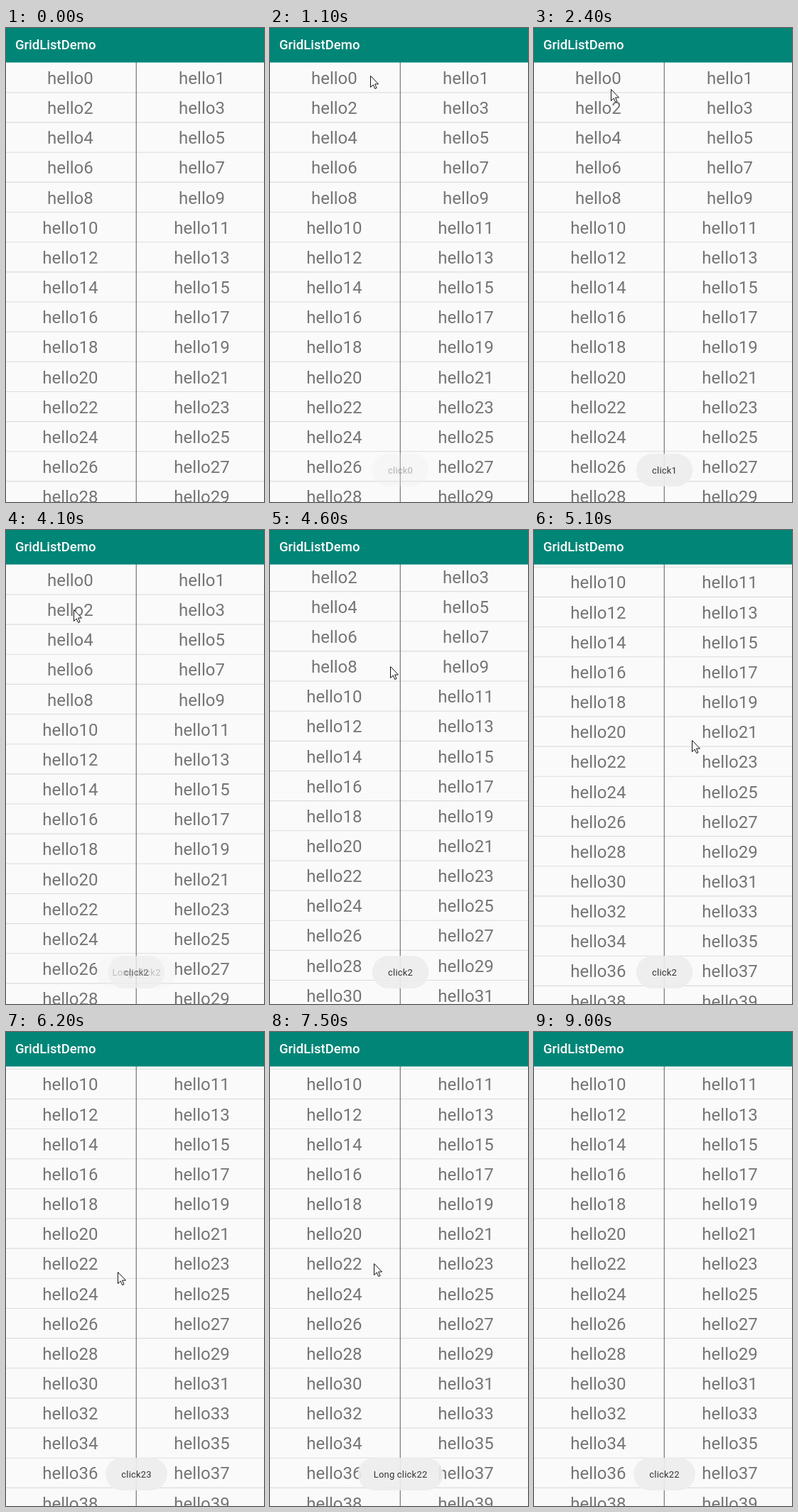
Write an HTML page that moves like this. It is 363 by 668 pixels and loops after 9600 ms.

```html
<!DOCTYPE html>
<html lang="en">
<head>
<meta charset="utf-8">
<title>GridListDemo</title>
<style>
  html, body { margin: 0; width: 100%; height: 100%; overflow: hidden; background: #fafafa; }
  svg { display: block; width: 363px; height: 668px; font-family: Roboto, sans-serif; }
  .row text { font-size: 24px; fill: #757575; text-anchor: middle; }
  .row path { stroke: #dcdcdc; stroke-width: 1.1; }
  .toast rect { fill: #eee; fill-opacity: .9; }
  .toast text { font-size: 12.94px; letter-spacing: .23px; fill: #333; text-anchor: middle; }
  .title { font-size: 18.5px; font-weight: 500; fill: #fff; }
</style>
</head>
<body>
<svg viewBox="0 0 363 668">
  <rect width="363" height="668" fill="#fafafa"/>
  <g id="list"></g>
  <rect x="182.7" y="48" width="1.1" height="620" fill="#6c6c6c"/>
  <rect width="363" height="48.6" fill="#008577"/>
  <text class="title" x="13" y="30">GridListDemo</text>
  <g id="toasts"></g>
  <path id="cursor" d="M.5 .5V16.5L4.2 13L6.7 18.5L9 17.6L6.6 12H11.5Z" fill="#fff" stroke="#111"/>
</svg>
<script>
const LOOP = 9600, STEP = 100, ROW = 42.15, TOP = 49, BASELINE = 79;
const FADE = 500, SCROLL = 207.3;

// Pointer moves: depart, arrive, x, y. Between moves it rests.
const entry = { x: 281, y: 30, from: 100, until: 9000 };
const moves = [
  [100, 800, 103, 67],
  [1000, 1400, 255, 67],
  [2000, 2400, 108, 86],
  [2400, 2700, 95, 112],
  [4200, 4600, 169, 192],
  [4600, 4900, 213, 284],
  [4900, 5100, 222, 296],
  [5200, 5400, 267, 306],
  [5700, 6200, 157, 338],
  [6300, 6600, 146, 326],
  [8800, 8900, 206, 320]
];
const messages = [
  [1100, "click0"], [2000, "click1"], [3200, "Long click2"], [3900, "click2"],
  [5800, "click23"], [7100, "Long click22"], [8200, "click22"]
];

const byId = id => document.getElementById(id);
const list = byId("list"), cursor = byId("cursor");
const progress = (t, start, duration) => Math.max(0, Math.min(1, (t - start) / duration));
const smooth = u => u * u * (3 - 2 * u);

list.innerHTML = Array.from({ length: 24 }, (_, i) => `
  <g class="row" transform="translate(0 ${i * ROW})">
    <text x="90.4" y="${BASELINE}">hello${2 * i}</text>
    <text x="275.5" y="${BASELINE}">hello${2 * i + 1}</text>
    <path d="M0 ${TOP + ROW - .2}H363"/>
  </g>`).join("");

// Newer messages sit below the ones they replace.
byId("toasts").innerHTML = messages.map(([, label]) => `
  <g class="toast"><rect y="600" height="46" rx="23"/><text x="183.6" y="628">${label}</text></g>`
).reverse().join("");
const toasts = [...document.querySelectorAll(".toast")].reverse();

for (const { children: [box, label] } of toasts) {
  const width = label.getComputedTextLength() + 44.4;
  box.setAttribute("x", 183.5 - width / 2);
  box.setAttribute("width", width);
}

function pointerAt(t) {
  let { x, y } = entry;
  for (const [depart, arrive, toX, toY] of moves) {
    const u = progress(t, depart, arrive - depart);
    x += (toX - x) * u;
    y += (toY - y) * u;
  }
  return { x, y };
}

function toastAlpha(i, t) {
  const fade = n => n < messages.length ? progress(t, messages[n][0] - STEP, FADE) : 0;
  return (1 - (1 - fade(i)) ** 2) * (1 - fade(i + 1)) ** 1.5;
}

function draw(time) {
  const t = Math.floor(time % LOOP / STEP) * STEP;
  const { x, y } = pointerAt(t);
  const offset = SCROLL * smooth(progress(t, 4428, 561));
  list.setAttribute("transform", `translate(0 ${-offset})`);
  cursor.setAttribute("transform", `translate(${x} ${y})`);
  cursor.setAttribute("visibility", t >= entry.from && t < entry.until ? "visible" : "hidden");
  toasts.forEach((toast, i) => toast.setAttribute("opacity", toastAlpha(i, t)));
}

const start = performance.now();
function tick() {
  draw(performance.now() - start);
  requestAnimationFrame(tick);
}
tick();
</script>
</body>
</html>
```
